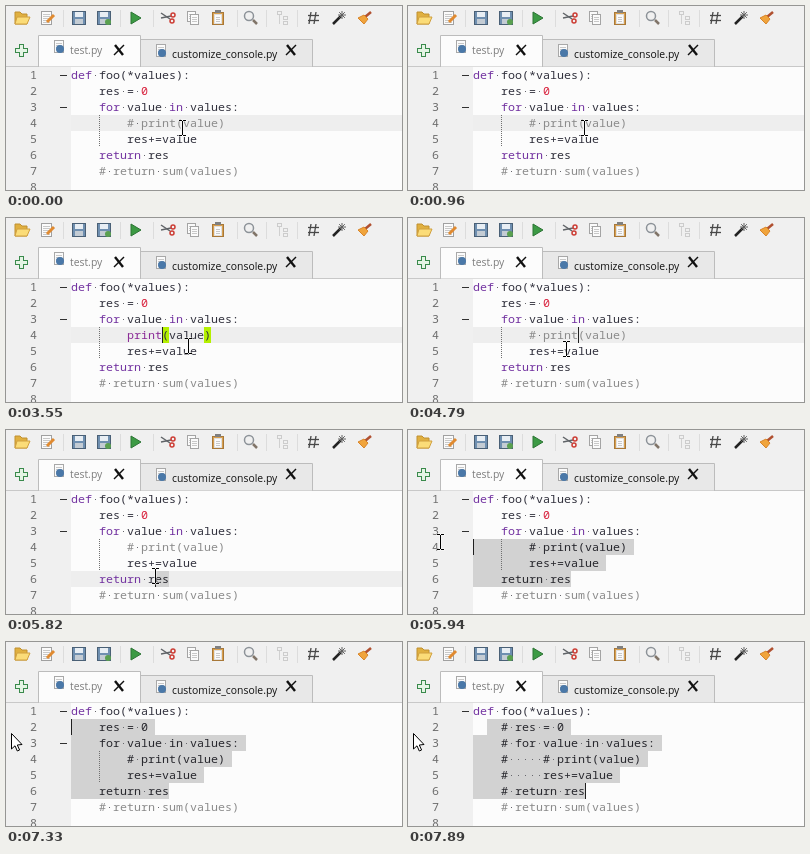
Write an HTML page with a canvas that moves like this. It is 396 by 184 pixels and loops after 8000 ms.

```html
<!DOCTYPE html>
<html lang="en">
<head>
<meta charset="utf-8">
<title>Toggle comments</title>
<style>
html, body { margin: 0; width: 100%; height: 100%; overflow: hidden; background: #f0f0f0; }
canvas { display: block; width: 396px; height: 184px; }
</style>
</head>
<body>
<canvas id="stage"></canvas>
<script>
const W = 396, H = 184, LOOP = 8000;
const LEFT = 65, TOP = 61, CHAR = 7, ROW = 16;
const MONO = '11.67px "Noto Sans Mono", "DejaVu Sans Mono", monospace';
const SANS = '10.4px "Open Sans", "Noto Sans", sans-serif';
const BLINK = 520, TICK = 120;

// Key moments in ms
const UNCOMMENT = 1240, RECOMMENT = 4080, DRAG = 5820, DROP = 6240, ARROW = 6660, COMMENT_ALL = 7890;

// Pointer key points: time, x, y
const PATH = [
  [1860, 176, 122], [2350, 176, 146], [2620, 177, 146], [3040, 207, 136], [3540, 182, 128],
  [4680, 182, 128], [4740, 158, 131], [5160, 177, 148], [5700, 178, 150],
  [DRAG, 149, 146], [DRAG + TICK, 32, 112], [DROP, 8, 92]
];

const COLORS = { word: '#7232a0', call: '#8a2a96', number: '#d8203c', comment: '#8a8a8a', name: '#30303c' };

const canvas = document.getElementById('stage');
const ctx = canvas.getContext('2d');
const scale = window.devicePixelRatio || 1;
canvas.width = W * scale;
canvas.height = H * scale;

const colX = col => LEFT + col * CHAR;
const rowY = row => TOP + row * ROW;

function rect(x, y, w, h, color) {
  ctx.fillStyle = color;
  ctx.fillRect(x, y, w, h);
}

function box(x, y, w, h, fill, stroke) {
  rect(x, y, w, h, stroke);
  rect(x + 1, y + 1, w - 2, h - 2, fill);
}

function poly(points, fill, stroke) {
  ctx.beginPath();
  points.forEach(([x, y]) => ctx.lineTo(x, y));
  ctx.closePath();
  ctx.fillStyle = fill;
  ctx.fill();
  if (!stroke) return;
  ctx.strokeStyle = stroke;
  ctx.lineWidth = 1;
  ctx.stroke();
}

function line(x1, y1, x2, y2, color, width = 1) {
  ctx.strokeStyle = color;
  ctx.lineWidth = width;
  ctx.beginPath();
  ctx.moveTo(x1, y1);
  ctx.lineTo(x2, y2);
  ctx.stroke();
}

function disc(x, y, r, color) {
  ctx.fillStyle = color;
  ctx.beginPath();
  ctx.arc(x, y, r, 0, Math.PI * 2);
  ctx.fill();
}

function ring(x, y, r, color, width) {
  ctx.strokeStyle = color;
  ctx.lineWidth = width;
  ctx.beginPath();
  ctx.arc(x, y, r, 0, Math.PI * 2);
  ctx.stroke();
}

function page(x, y, w, h, stroke) {
  box(x, y, w, h, '#fbfbfb', stroke);
  for (let d = 3; d < h - 2; d += 2) rect(x + 2, y + d, w - 4, 1, '#c8c8c8');
}

function floppy(x) {
  box(x - 7, 5, 14, 14, '#6f8fb0', '#4a6076');
  rect(x - 4, 6, 8, 5, '#e8eef4');
  rect(x - 4, 13, 8, 5, '#c4ccd4');
}

function toolbar() {
  rect(0, 0, W, 27, '#f0f0f0');
  for (const x of [57, 114, 147, 231, 260, 291]) rect(x, 4, 1, 17, '#dcdcdc');

  poly([[9, 6], [14, 6], [16, 8], [21, 8], [21, 18], [9, 18]], '#e0b040', '#c09030');
  poly([[11, 11], [24, 11], [21, 18], [9, 18]], '#fbdc78', '#d0a040');

  page(35, 5, 11, 14, '#a0a0a0');
  line(41, 16, 48, 9, '#e08a30', 3);

  floppy(73);
  floppy(98);
  disc(102, 16, 3, '#5aa050');

  poly([[125, 6], [135, 12], [125, 18]], '#3c9a44', '#2c7434');

  line(155, 7, 164, 13, '#606468', 1.5);
  line(155, 12, 165, 10, '#606468', 1.5);
  ring(167, 9, 2, '#cc3c34', 1.5);
  ring(166, 15, 2, '#cc3c34', 1.5);

  page(181, 5, 9, 11, '#a4a4a4');
  page(184, 8, 9, 11, '#a4a4a4');

  box(206, 6, 12, 13, '#d8a050', '#a87838');
  page(208, 8, 8, 10, '#e0e0e0');
  rect(209, 4, 6, 3, '#808080');

  line(247, 14, 251, 18, '#807468', 2.5);
  ring(243, 10, 4.5, '#8c9298', 1.5);

  rect(273, 7, 1, 11, '#d0d0d0');
  for (const y of [5, 10, 15]) box(y > 5 ? 277 : 271, y, 5, 4, '#f0f0f0', '#cccccc');

  for (const d of [0, 5]) {
    line(305 + d, 6, 303 + d, 18, '#484848', 1.3);
    line(302, 9.5 + d, 313, 9.5 + d, '#484848', 1.3);
  }

  line(327, 18, 335, 10, '#222', 2.5);
  for (let a = 0; a < Math.PI; a += Math.PI / 4) {
    const dx = Math.cos(a) * 4, dy = Math.sin(a) * 4;
    line(336 - dx, 9 - dy, 336 + dx, 9 + dy, '#606060');
  }

  line(359, 11, 365, 6, '#b05030', 2.5);
  poly([[352, 12], [358, 9], [362, 13], [358, 18]], '#f0a43c', '#d88428');
}

function tab(x, top, w, label, bg, fg) {
  const base = top + 19;
  poly([[x + .5, 61], [x + .5, top + .5], [x + w - .5, top + .5], [x + w - .5, 61]], bg, '#bcbcbc');
  page(x + 16, base - 14, 10, 13, '#a8a8a8');
  disc(x + 22, base - 5, 4, '#4a78a8');
  ctx.font = SANS;
  ctx.fillStyle = fg;
  ctx.fillText(label, x + 32, base);
  const cx = x + w - 22;
  line(cx - 4, 39, cx + 4, 49, '#101010', 2.4);
  line(cx + 5, 39, cx - 5, 49, '#101010', 1.5);
}

function tabs() {
  rect(0, 27, W, 34, '#f0f0f0');
  for (const [inset, color] of [[0, '#3a8a4c'], [1, '#e4f4e4']]) {
    const long = 13 - 2 * inset, short = 5 - 2 * inset;
    rect(13 + inset, 38 + inset, short, long, color);
    rect(9 + inset, 42 + inset, long, short, color);
  }
  rect(0, 60, W, 1, '#c8c8c8');
  tab(134, 33, 173, 'customize_console.py', '#e8e8e8', '#101010');
  tab(32, 29, 103, 'test.py', '#fcfcfc', '#7c7c7c');
}

// The pointer is sampled in ticks, as in a screen recording
function pointerAt(t) {
  const time = Math.floor((t - TICK / 2) / TICK) * TICK + TICK / 2;
  const next = PATH.findIndex(p => p[0] > time);
  if (next === 0) return PATH[0].slice(1);
  if (next < 0) return PATH[PATH.length - 1].slice(1);
  const [t0, x0, y0] = PATH[next - 1], [t1, x1, y1] = PATH[next];
  const k = (time - t0) / (t1 - t0);
  return [Math.round(x0 + (x1 - x0) * k), Math.round(y0 + (y1 - y0) * k)];
}

// Dragging selects from the end of row 5 back to the pointer
function selectionAt(t) {
  if (t < DRAG) return null;
  if (t >= COMMENT_ALL) return { row: 1, col: 2, end: 16 };
  const [x, y] = pointerAt(t);
  return { row: Math.floor((y - TOP) / ROW), col: Math.max(0, Math.round((x - LEFT) / CHAR)), end: 14 };
}

function caretOn(t) {
  if (t < DRAG) return Math.floor((t + 90) / BLINK) % 2 === 1;
  const since = Math.max(0, t - (t < COMMENT_ALL ? DROP : COMMENT_ALL));
  return Math.floor(since / BLINK) % 2 === 0;
}

function source(open, all) {
  const call = open ? '    print(value)' : '    # print(value)';
  const body = ['res = 0', 'for value in values:', call, '    res+=value', 'return res'];
  const mark = all ? '    # ' : '    ';
  return ['def foo(*values):', ...body.map(s => mark + s), '    # return sum(values)', ''];
}

function colorsOf(text) {
  const colors = [];
  for (const [token] of text.matchAll(/#.*|\w+|./g)) {
    let kind = 'name';
    if (token[0] === '#') kind = 'comment';
    else if (/^(def|for|in|return)$/.test(token)) kind = 'word';
    else if (token === 'print') kind = 'call';
    else if (/^\d+$/.test(token)) kind = 'number';
    for (const _ of token) colors.push(COLORS[kind]);
  }
  return colors;
}

function drawRow(text, row, sel) {
  const y = rowY(row), colors = colorsOf(text), indent = text.search(/\S/);
  let from = 0, to = 0;
  if (sel && row >= sel.row && row <= 5) {
    from = row === sel.row ? sel.col : 0;
    to = row === 5 ? sel.end : text.length + 1;
    rect(colX(from), y, (to - from) * CHAR, ROW, '#d2d2d2');
  }
  if (indent === 8) {
    for (let d = 0; d < ROW; d += 2) rect(colX(4), y + d, 1, 1, '#707070');
  }
  ctx.font = MONO;
  [...text].forEach((ch, i) => {
    const x = colX(i);
    if (ch === ' ') {
      if (i > indent) rect(x + 3, y + 8, 1, 1, '#66666c');
      return;
    }
    ctx.fillStyle = i >= from && i < to ? '#26262c' : colors[i];
    ctx.fillText(ch, x, y + 12);
  });
}

function editor(t) {
  const open = t >= UNCOMMENT && t < RECOMMENT, all = t >= COMMENT_ALL;
  const sel = selectionAt(t);
  const caret = sel || { row: 3, col: open ? 13 : 15 };

  rect(0, TOP, W, H - TOP, '#fcfcfc');
  rect(0, TOP, LEFT, H - TOP, '#f0f0f0');
  if (!sel || sel.row === 5) rect(LEFT, rowY(caret.row), W - LEFT, ROW, '#eeeeee');
  if (open) {
    for (const col of [13, 19]) rect(colX(col), rowY(3), CHAR, ROW, '#b4f000');
  }
  source(open, all).forEach((text, row) => {
    ctx.font = MONO;
    ctx.fillStyle = '#6c6c6c';
    ctx.fillText(row + 1, 24, rowY(row) + 12);
    drawRow(text, row, sel);
  });
  for (const row of all ? [0] : [0, 2]) rect(54, rowY(row) + 8, 7, 1, '#303030');

  if (caretOn(t)) {
    const [row, col] = all ? [5, sel.end] : [caret.row, caret.col];
    rect(colX(col), rowY(row), 1, ROW, '#202020');
  }
}

function beam(x, y, grow, color) {
  const bar = (dx, dy, w, h) => rect(x + dx - grow, y + dy - grow, w + 2 * grow, h + 2 * grow, color);
  bar(0, -7, 1, 14);
  for (const dy of [-8, 7]) {
    bar(-3, dy, 3, 1);
    bar(1, dy, 3, 1);
  }
}

function pointer(t) {
  if (t >= ARROW) {
    poly([[5.5, 91.5], [5.5, 107], [9, 103.8], [11.3, 109], [13.6, 108], [11.3, 103], [16, 102.5]], '#fff', '#000');
    return;
  }
  const [x, y] = pointerAt(t);
  beam(x, y, 0.5, 'rgba(255,255,255,0.8)');
  beam(x, y, 0, '#000');
}

function draw(now) {
  const t = now % LOOP;
  ctx.setTransform(scale, 0, 0, scale, 0, 0);
  toolbar();
  tabs();
  editor(t);
  pointer(t);
}

let start;
function tick(now) {
  if (start === undefined) start = now;
  draw(now - start);
  requestAnimationFrame(tick);
}
draw(0);
requestAnimationFrame(tick);
</script>
</body>
</html>
```
